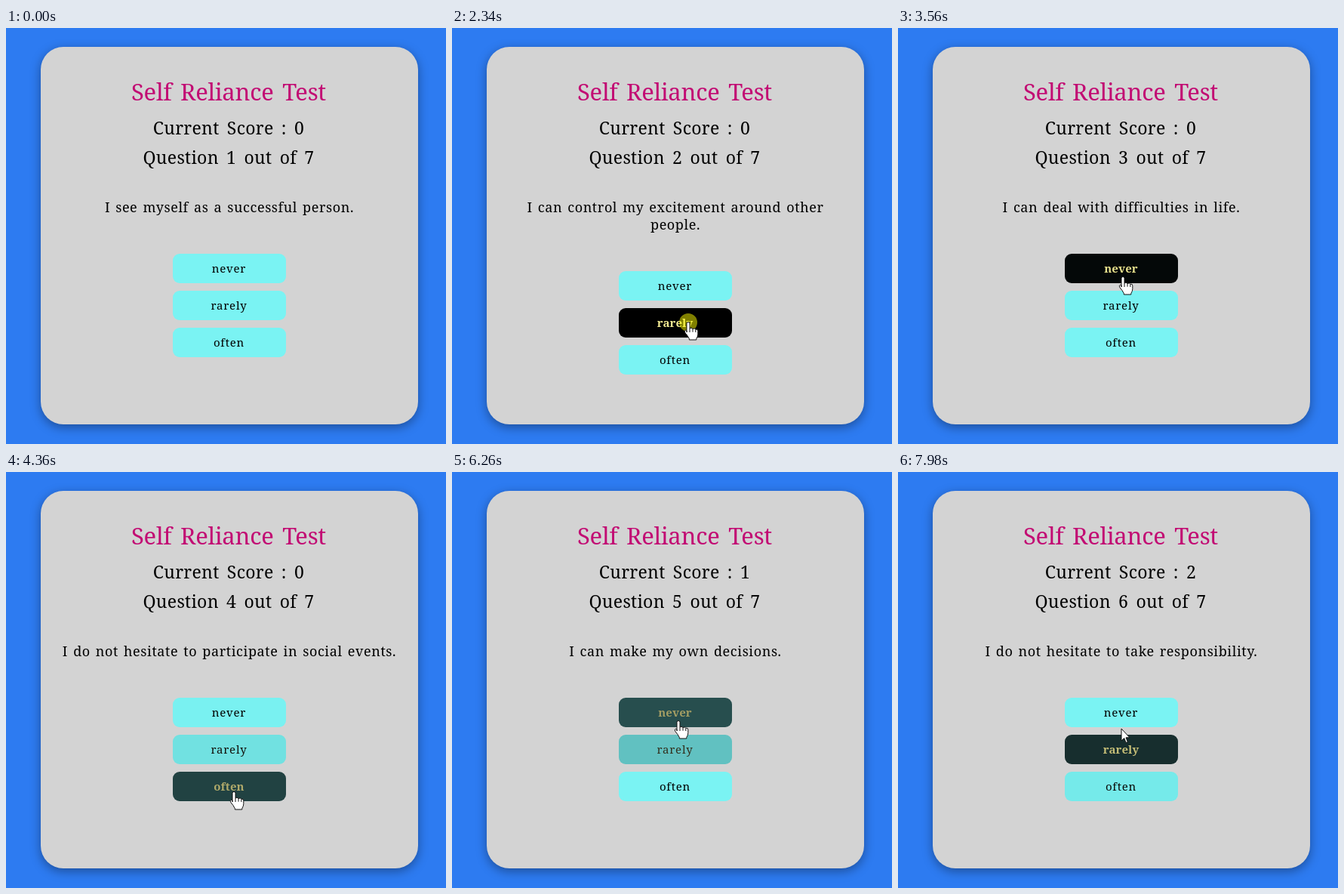
Recreate the animation shown at these times as an HTML page. Size 583x551 px, loop 8000 ms.

```html
<!DOCTYPE html>
<html lang="en">
<head>
<meta charset="utf-8">
<title>Self Reliance Test</title>
<style>
html, body { margin: 0; width: 100%; height: 100%; overflow: hidden; background: #2d7bf1; }
svg { display: block; font-family: "Noto Serif", "DejaVu Serif", serif; }
text { text-anchor: middle; }
.card { fill: #d3d3d3; filter: drop-shadow(0 4px 7px rgba(0, 0, 0, .36)); }
.title { font-size: 31px; letter-spacing: -.3px; word-spacing: 4px; fill: #c20b73; }
.head { font-size: 23px; letter-spacing: .3px; word-spacing: 4px; }
.ask { font-size: 18px; letter-spacing: .6px; word-spacing: 1.8px; }
.label { font-size: 15px; letter-spacing: .8px; }
.label.bold { font-weight: 700; letter-spacing: .1px; }
.pointer { fill: #fff; stroke: #111; stroke-linejoin: round; }
</style>
</head>
<body>
<svg width="583" height="551" viewBox="0 0 583 551">
  <rect class="card" x="46" y="25" width="500" height="500" rx="30"/>
  <text class="title" x="295" y="96">Self Reliance Test</text>
  <text class="head" id="score" x="295" y="141"></text>
  <text class="head" id="count" x="295" y="180"></text>
  <text class="ask" id="line1" x="296" y="244"></text>
  <text class="ask" id="line2" x="296" y="267"></text>
  <g id="buttons"></g>
  <circle id="ring" r="12" fill="#ff0" fill-opacity=".5"/>
  <g class="pointer" id="pointer">
    <path id="hand" d="M-2 13V1.500a2 2 0 0 1 4 0V8q2-2 4 .5q2.500-1.500 3.800 .7q3-.8 3 2.300v4q0 3-2 6v1.500h-9.500v-1.500q-2-4-5.500-8q-1.500-3 1-3.300q1.200 0 1.200 1.500zM2 8v5M6 8.700v4M9.800 9.500v3.500"/>
    <path id="arrow" d="M0 0V16l3.700-3.500 2.400 6 2.300-1-2.400-5.700h5z"/>
  </g>
</svg>
<script>
const LOOP = 8000, TICK = 10, FADE = 530;
const $ = id => document.getElementById(id);

// Runs of screen refreshes: first, last, count
const runs = [
  [400, 1110, 8], [1210, 1940, 8], [2040, 2040, 1], [2340, 3140, 9],
  [3240, 3760, 6], [3960, 4360, 5], [4560, 4660, 2], [4860, 5260, 5],
  [5460, 5560, 2], [5960, 6560, 7], [6780, 7490, 8], [7790, 7980, 3]
];
const steps = [0, ...runs.flatMap(([a, b, n]) =>
  Array.from({ length: n }, (_, i) => n > 1 ? Math.round((a + (b - a) * i / (n - 1)) / TICK) * TICK : a))];

// Pointer path: time, x, y
const path = [
  [400, 434, 488], [500, 420, 473], [600, 382, 418], [690, 336, 338],
  [800, 321, 330], [1000, 318, 328], [1450, 318, 328], [1560, 316, 372],
  [1840, 313, 390], [2880, 313, 390], [3130, 300, 338], [3240, 298, 330],
  [3860, 298, 330], [4060, 300, 385], [4260, 302, 424], [4760, 302, 424],
  [4960, 302, 380], [5160, 302, 371], [5860, 302, 371], [6060, 300, 336],
  [6260, 300, 330], [6570, 300, 330], [6600, 299, 339], [6800, 297, 347],
  [6860, 295, 388], [6893, 293, 397], [6980, 292, 404], [7190, 292, 408],
  [7540, 292, 408], [7600, 293, 386], [7790, 295, 368], [7980, 296, 340]
];

const clicks = [1210, 2340, 3660, 4560, 5460, 6360, 7390];
const questions = [
  [0, "I see myself as a successful person.", ""],
  [1310, "I can control my excitement around other", "people."],
  [2440, "I can deal with difficulties in life.", ""],
  [3760, "I do not hesitate to participate in social events.", ""],
  [5560, "I can make my own decisions.", ""],
  [6460, "I do not hesitate to take responsibility.", ""]
];
const scores = [[0, 0], [4660, 1], [7490, 2]];

const lastIndex = (list, t) => list.reduce((found, row, i) => row[0] <= t ? i : found, 0);
const mix = (a, b, k) => a + (b - a) * k;
const blend = (from, to, k) => `rgb(${from.map((v, i) => Math.round(mix(v, to[i], k)))})`;

// The standard "ease" curve, solved by bisection
function ease(x) {
  let lo = 0, hi = 1;
  const bez = (s, a, b) => 3 * s * (1 - s) ** 2 * a + 3 * s * s * (1 - s) * b + s ** 3;
  for (let i = 0; i < 16; i++) {
    const mid = (lo + hi) / 2;
    if (bez(mid, .25, .25) < x) lo = mid; else hi = mid;
  }
  return bez(lo, .1, 1);
}

function pointerAt(t) {
  const i = lastIndex(path, t), a = path[i], b = path[i + 1] || a;
  const k = b === a ? 0 : Math.max(0, (t - a[0]) / (b[0] - a[0]));
  return [mix(a[1], b[1], k), mix(a[2], b[2], k)];
}

const shiftAt = t => questions[lastIndex(questions, t)][2] ? 23 : 0;

function hitAt(t) {
  if (t < 400) return -1;
  const [x, y] = pointerAt(t);
  return [0, 1, 2].findIndex(i => {
    const top = 299 + 49 * i + shiftAt(t);
    return x >= 221 && x <= 371 && y >= top && y < top + 39;
  });
}

// Hover level of every button, for each tick of the loop
const levels = [0, 1, 2].map(i => {
  let from = 0, goal = 0, since = -FADE, level = 0;
  return Array.from({ length: LOOP / TICK }, (_, n) => {
    const t = n * TICK, next = hitAt(t) === i ? 1 : 0;
    if (next !== goal) { from = level; goal = next; since = t; }
    level = mix(from, goal, ease(Math.min(1, (t - since) / FADE)));
    return level;
  });
});

function make(name, attrs, parent) {
  const el = document.createElementNS("http://www.w3.org/2000/svg", name);
  for (const key in attrs) el.setAttribute(key, attrs[key]);
  return parent.appendChild(el);
}

const buttons = ["never", "rarely", "often"].map((word, i) => {
  const box = make("rect", { x: 221, y: 299 + 49 * i, width: 150, height: 39, rx: 9 }, $("buttons"));
  const label = make("text", { x: 295.5, y: 324 + 49 * i, class: "label" }, $("buttons"));
  label.textContent = word;
  return { box, label };
});

const show = (el, on) => el.setAttribute("visibility", on ? "visible" : "hidden");

function draw(t) {
  const q = lastIndex(questions, t), [x, y] = pointerAt(t);
  $("score").textContent = `Current Score : ${scores[lastIndex(scores, t)][1]}`;
  $("count").textContent = `Question ${q + 1} out of 7`;
  $("line1").textContent = questions[q][1];
  $("line2").textContent = questions[q][2];
  $("buttons").setAttribute("transform", `translate(0 ${shiftAt(t)})`);
  buttons.forEach(({ box, label }, i) => {
    const k = levels[i][t / TICK];
    box.setAttribute("fill", blend([122, 243, 243], [0, 0, 0], k));
    label.setAttribute("fill", blend([0, 0, 0], [240, 232, 146], k));
    label.classList.toggle("bold", k > .5);
  });
  const place = `translate(${Math.round(x)} ${Math.round(y)})`;
  $("pointer").setAttribute("transform", place);
  $("ring").setAttribute("transform", place);
  const seen = t >= 400, over = hitAt(t) >= 0;
  show($("hand"), seen && over);
  show($("arrow"), seen && !over);
  show($("ring"), clicks.includes(t));
}

const start = performance.now();
let shown = -1;
function frame() {
  const now = (performance.now() - start) % LOOP;
  const step = steps.reduce((found, s) => s <= now ? s : found, 0);
  if (step !== shown) draw(shown = step);
  requestAnimationFrame(frame);
}
frame();
</script>
</body>
</html>
```
